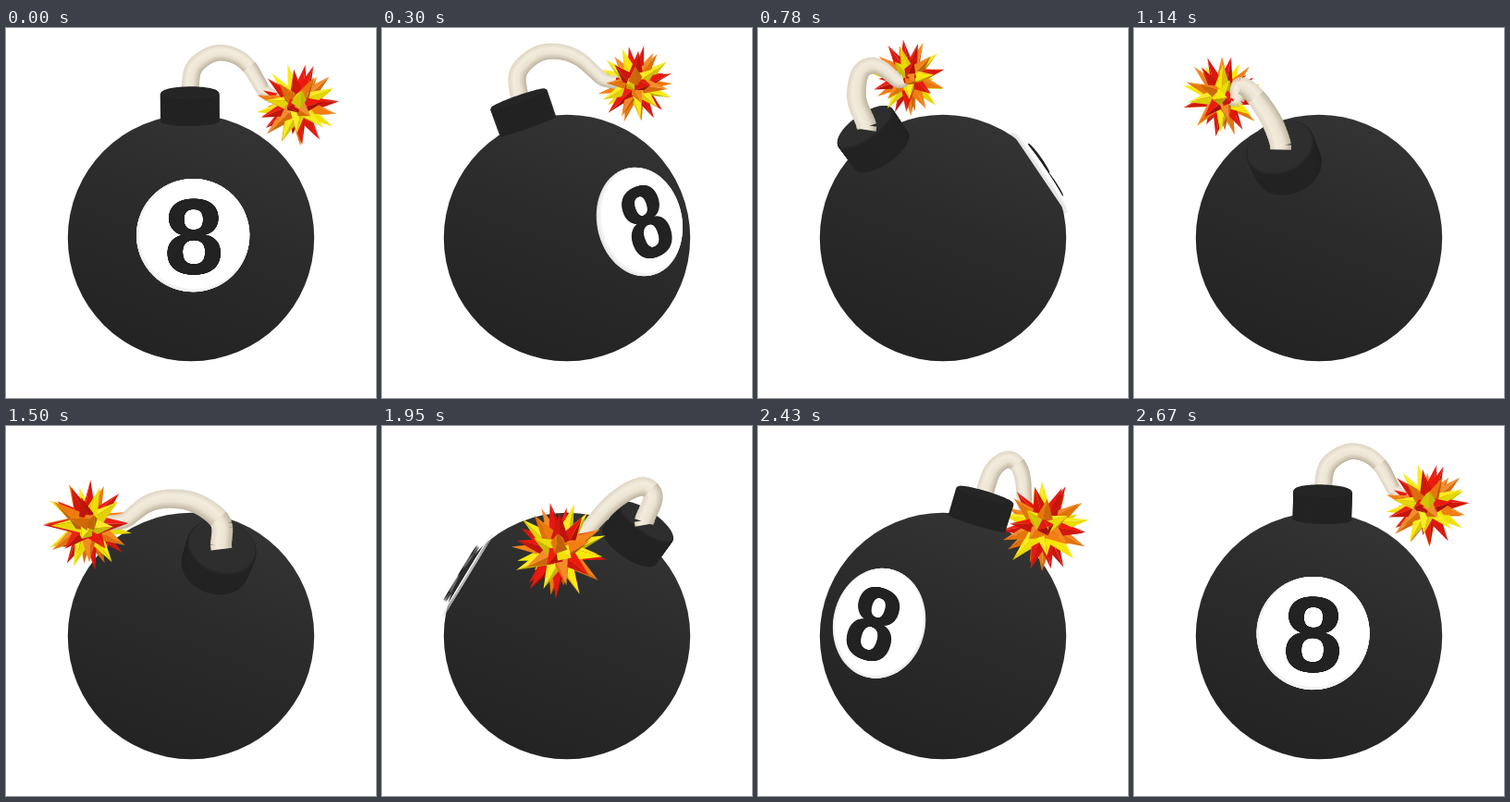
An HTML page with a canvas for the animation above (2700 ms loop, 400 by 400 pixels).

```html
<!DOCTYPE html>
<html lang="en">
<head>
<meta charset="utf-8">
<title>Spinning eight-ball bomb</title>
<style>
  html, body { margin: 0; width: 100%; height: 100%; overflow: hidden; background: #fff; }
  canvas { display: block; width: 400px; height: 400px; }
</style>
</head>
<body>
<canvas id="stage" width="400" height="400"></canvas>
<script>
const ctx = document.getElementById('stage').getContext('2d');

// World units: ball radius 1, x right, y up, z towards the viewer.
const CENTER = [200, 227], BALL = 133.2, EYE = 6, FOCAL = 787;
const LOOP = 2700, STEP = 30, TAU = Math.PI * 2;
const AXIS = [0, Math.cos(Math.PI / 6), 0.5];
const DISC_RADIUS = 0.392, DISC_TOP = 0.96, CAP_RADIUS = 0.243;
const SPARK = [0.808, 1, 0.485];
const SPARK_HUES = [[3, 88, 47], [56, 95, 52], [29, 90, 52]];

const dot = (a, b) => a[0] * b[0] + a[1] * b[1] + a[2] * b[2];
const cross = (a, b) => [
  a[1] * b[2] - a[2] * b[1],
  a[2] * b[0] - a[0] * b[2],
  a[0] * b[1] - a[1] * b[0]
];
const add = (a, b, k = 1) => a.map((v, i) => v + b[i] * k);
const scale = (a, k) => a.map(v => v * k);
const unit = a => scale(a, 1 / Math.hypot(...a));
const toEye = p => add([0, 0, EYE], p, -1);
const facesEye = (normal, p) => dot(normal, toEye(p)) > 0;

function spin(p, angle) {
  const c = Math.cos(angle), s = Math.sin(angle), along = dot(AXIS, p) * (1 - c);
  return add(add(scale(p, c), cross(AXIS, p), s), AXIS, along);
}

function project(p) {
  const s = FOCAL / (EYE - p[2]);
  return [CENTER[0] + p[0] * s, CENTER[1] - p[1] * s, s];
}

function fillPoly(points, fill) {
  if (points.length < 3) return;
  ctx.beginPath();
  points.forEach(p => ctx.lineTo(...project(p).slice(0, 2)));
  ctx.closePath();
  ctx.fillStyle = fill;
  ctx.fill();
}

function ring(center, right, up, radius, count = 72) {
  return Array.from({ length: count }, (_, i) => {
    const a = i / count * TAU;
    return add(add(center, right, radius * Math.cos(a)), up, radius * Math.sin(a));
  });
}

function drawBall() {
  const shade = ctx.createLinearGradient(250, 95, 150, 360);
  shade.addColorStop(0, '#343434');
  shade.addColorStop(0.5, '#2a2a2a');
  shade.addColorStop(1, '#232323');
  ctx.beginPath();
  ctx.arc(...CENTER, BALL, 0, TAU);
  ctx.fillStyle = shade;
  ctx.fill();
}

function drawEight(frame) {
  ctx.font = 'bold 100px "Liberation Sans", Arial, sans-serif';
  ctx.textAlign = 'center';
  ctx.fillStyle = '#222';
  const k = 0.735 / 100;
  for (let h = 0.985; h < 1.012; h += 0.005) {
    const o = scale(frame.normal, h);
    const origin = project(o);
    const px = project(add(o, frame.right, 0.1)), py = project(add(o, frame.up, -0.1));
    const slope = (q, i) => (q[i] - origin[i]) * 10 * k;
    ctx.save();
    ctx.transform(slope(px, 0), slope(px, 1), slope(py, 0), slope(py, 1), origin[0], origin[1]);
    ctx.fillText('8', 0.5, 36);
    ctx.restore();
  }
}

function drawDisc(frame, visible = () => true) {
  const layer = (h, radius, fill, shift = 0) => {
    const mid = add(scale(frame.normal, h), [shift, shift, 0]);
    fillPoly(ring(mid, frame.right, frame.up, radius).filter(visible), fill);
  };
  for (let h = 0.938; h < DISC_TOP; h += 0.005) layer(h, DISC_RADIUS, '#e6e6e4');
  layer(DISC_TOP - 0.003, DISC_RADIUS - 0.002, '#f3f3f2', 0.002);
  layer(DISC_TOP, DISC_RADIUS - 0.012, '#fff', 0.008);
}

function drawBallAndDisc(frame) {
  if (facesEye(frame.normal, scale(frame.normal, DISC_TOP))) {
    drawBall();
    drawDisc(frame);
    drawEight(frame);
  } else {
    // Seen from behind, only the rim on the near side of the horizon covers the ball.
    drawEight(frame);
    drawDisc(frame);
    drawBall();
    drawDisc(frame, p => facesEye(p, p));
  }
}

function drawCap(angle) {
  const axis = spin([0, 1, 0], angle), right = spin([1, 0, 0], angle), up = spin([0, 0, 1], angle);
  const layer = (h, r, fill) => fillPoly(ring(scale(axis, h), right, up, r), fill);
  for (let h = 0.96; h < 1.187; h += 0.005) layer(h, CAP_RADIUS, '#232323');
  layer(1.192, CAP_RADIUS - 0.003, '#272727');
  layer(1.2, CAP_RADIUS - 0.012, facesEye(axis, scale(axis, 1.2)) ? '#2e2e2e' : '#252525');
}

// Fuse centre line: distance towards the spark, height.
const FUSE = [[0, 1.17], [0.026, 1.361], [0.124, 1.445], [0.27, 1.475], [0.427, 1.422],
  [0.541, 1.323], [0.615, 1.206], [0.7, 1.1], [0.942, 1]];

function fusePoint(u) {
  const last = FUSE.length - 1, x = u * last, i = Math.min(last - 1, Math.floor(x)), f = x - i;
  const at = j => FUSE[Math.max(0, Math.min(last, j))];
  const [q, y] = [0, 1].map(n => {
    const a = at(i - 1)[n], b = at(i)[n], c = at(i + 1)[n], d = at(i + 2)[n];
    return b + 0.5 * f * (c - a + f * (2 * a - 5 * b + 4 * c - d + f * (3 * (b - c) + d - a)));
  });
  const bulge = 0.065 * Math.sqrt(Math.max(0, Math.sin(Math.PI * u)));
  return [0.857 * q, y, 0.515 * q + bulge];
}

function fuseItems(angle) {
  const count = 56, items = [];
  for (let i = 0; i < count; i++) {
    const a = spin(fusePoint(i / count), angle), b = spin(fusePoint((i + 1) / count), angle);
    items.push({ depth: (a[2] + b[2]) / 2, draw: () => drawFuseSegment(a, b, 0.073 - 0.024 * i / count) });
  }
  return items;
}

function drawFuseSegment(a, b, radius) {
  const [ax, ay, s] = project(a), [bx, by] = project(b);
  const length = Math.hypot(bx - ax, by - ay) || 1;
  const tx = (bx - ax) / length, ty = (by - ay) / length, w = radius * s;
  // Keep the lit side of the tube up and to the left.
  const side = ty - tx * 1.2 > 0 ? -1 : 1;
  const nx = ty * side * w, ny = -tx * side * w;
  const shade = ctx.createLinearGradient(ax + nx, ay + ny, ax - nx, ay - ny);
  shade.addColorStop(0, '#ddd5c3');
  shade.addColorStop(0.3, '#f3ecdd');
  shade.addColorStop(0.65, '#ebe3d2');
  shade.addColorStop(1, '#beb49f');
  ctx.beginPath();
  ctx.moveTo(ax - tx * 0.8, ay - ty * 0.8);
  ctx.lineTo(bx + tx * 0.8, by + ty * 0.8);
  ctx.lineWidth = w * 2;
  ctx.strokeStyle = shade;
  ctx.stroke();
}

function sparkItems(angle) {
  const count = 46, light = unit([-0.3, 0.6, 0.7]), items = [];
  for (let i = 0; i < count; i++) {
    const y = 1 - (2 * i + 1) / count, r = Math.sqrt(1 - y * y), turn = i * 2.39996;
    const dir = [r * Math.cos(turn), y, r * Math.sin(turn)];
    const right = unit(cross(dir, [0.3, 0.2, 0.9])), up = cross(dir, right);
    const place = p => spin(add(SPARK, p), angle);
    const tip = place(scale(dir, 0.315));
    const base = ring(scale(dir, 0.095), right, up, 0.06, 4).map(place);
    const [hue, sat, lum] = SPARK_HUES[i % 3];
    base.forEach((p, j) => {
      const q = base[(j + 1) % 4];
      const normal = unit(cross(add(q, p, -1), add(tip, p, -1)));
      const mid = scale(add(add(p, q), tip), 1 / 3);
      if (!facesEye(normal, mid)) return;
      const glow = lum * (0.84 + 0.25 * dot(normal, light));
      items.push({ depth: mid[2], draw: () => fillPoly([p, q, tip], `hsl(${hue},${sat}%,${glow}%)`) });
    });
  }
  return items;
}

function drawScene(time) {
  const angle = (1 + 4 * Math.floor(time % LOOP / STEP)) * Math.PI / 180;
  const capTop = scale(spin([0, 1, 0], angle), 1.2);
  const capFacing = facesEye(capTop, capTop);

  ctx.fillStyle = '#fff';
  ctx.fillRect(0, 0, 400, 400);
  drawBallAndDisc({
    normal: spin(unit([0, 0.02, 1]), angle),
    right: spin([1, 0, 0], angle),
    up: spin(unit([0, 1, -0.02]), angle)
  });

  if (capFacing) drawCap(angle);
  [...fuseItems(angle), ...sparkItems(angle)]
    .sort((a, b) => a.depth - b.depth)
    .forEach(item => item.draw());
  if (!capFacing) drawCap(angle);
}

const start = performance.now();
function tick() {
  drawScene(performance.now() - start);
  requestAnimationFrame(tick);
}
tick();
</script>
</body>
</html>
```
